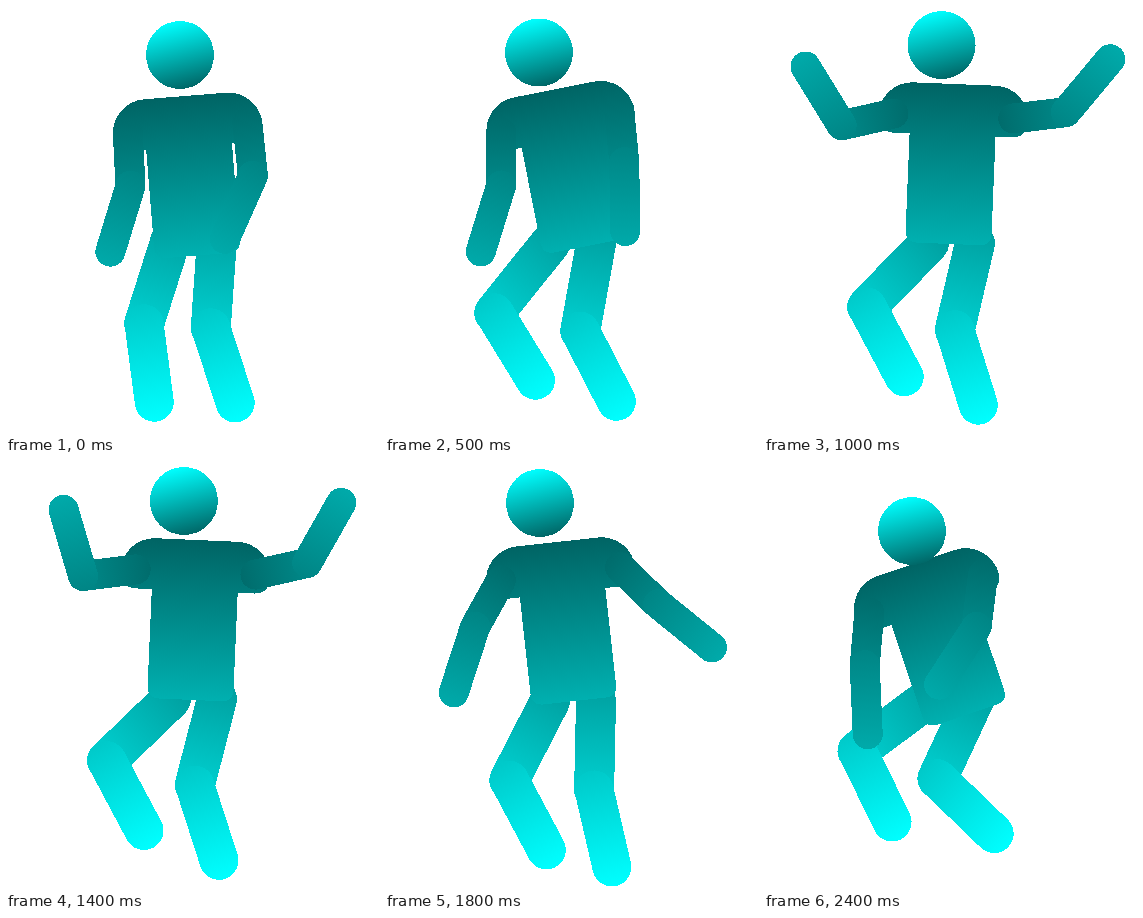
Recreate the animation shown at these times as an HTML page. Size 373 px wide and 428 px high, loop 2.5 s.

```html
<!DOCTYPE html>
<html lang="en">
<head>
<meta charset="utf-8">
<title>Dancing figure</title>
<style>
  html, body { margin: 0; width: 100%; height: 100%; overflow: hidden; background: #fff; }
  svg { display: block; width: 373px; height: 428px; }
</style>
</head>
<body>
<svg id="stage" viewBox="0 0 373 428" shape-rendering="crispEdges"><defs id="defs"></defs></svg>
<script>
const NS = 'http://www.w3.org/2000/svg';
const stage = document.getElementById('stage');
const defs = document.getElementById('defs');
const STEP = 100, STEPS = 25;
const UPPER_ARM = 53, FOREARM = 69, THIGH = 89, CALF = 79;
const SHOULDER = { x: 60, y: 32 };
const HIPS = { left: 165, right: 211 };

const linear = t => t;
const smooth = t => t * t * (3 - 2 * t);
const easeIn = power => t => t ** power;
const easeOut = power => t => 1 - (1 - t) ** power;

// Arms and legs hold the angles of the upper and lower part: 0 points right, 90 down.
const stand = {
  body: { headX: 174, headY: 49, x: 179, y: 90, tilt: -4.6, hipY: 233 },
  arms: { left: 87, leftLow: 107, right: 84, rightLow: 114 },
  legs: { left: 107.6, leftLow: 82.6, right: 94, rightLow: 72 }
};
const crouch = {
  body: { headX: 148, headY: 69, x: 152, y: 101, tilt: -18.6, hipY: 236 },
  arms: { left: 95, leftLow: 87.5, right: 97, rightLow: 123 },
  legs: { left: 143.5, leftLow: 64, right: 115, rightLow: 44 }
};
const rise = {
  body: { headX: 153, headY: 52, x: 166, y: 87, tilt: -16, hipY: 236 },
  arms: { left: 84, leftLow: 107, right: 93, rightLow: 100 },
  legs: { left: 140.4, leftLow: 55, right: 109.2, rightLow: 48.5 }
};
const swing = {
  body: { headX: 155, headY: 41, x: 172, y: 80, tilt: -6.3, hipY: 239 },
  arms: { left: 119, leftLow: 108, right: 44, rightLow: 39 },
  legs: { left: 117.2, leftLow: 62, right: 91.2, rightLow: 77 }
};
const cheer = {
  body: { headX: 178, headY: 39, x: 191, y: 78, tilt: 2.5, hipY: 237 },
  arms: { left: 175, leftLow: 259.5, right: -15, rightLow: -64.5 },
  legs: { left: 136.8, leftLow: 62, right: 105, rightLow: 72 }
};

// The dance runs through these moves and then back again.
const even = { body: linear, arms: linear, legs: linear };
const moves = [
  { from: stand, to: crouch, begin: 0, end: 1, ease: even },
  { from: crouch, to: rise, begin: 1, end: 3, ease: even },
  { from: rise, to: swing, begin: 3, end: 7,
    ease: { body: smooth, arms: easeIn(2.5), legs: smooth } },
  { from: swing, to: cheer, begin: 7, end: STEPS / 2,
    ease: { body: easeOut(5), arms: easeOut(2.5), legs: easeOut(2.5) } }
];

function poseAt(step) {
  const { from, to, begin, end, ease } = moves.find(move => step < move.end);
  const time = (step - begin) / (end - begin);
  const blend = part => {
    const k = ease[part](time), mixed = {};
    for (const key in from[part]) mixed[key] = from[part][key] + (to[part][key] - from[part][key]) * k;
    return mixed;
  };
  return { body: blend('body'), arms: blend('arms'), legs: blend('legs') };
}

function add(parent, tag, attrs) {
  const node = document.createElementNS(NS, tag);
  for (const key in attrs) node.setAttribute(key, attrs[key]);
  return parent.appendChild(node);
}

function shade(id, from, to, turn = 0) {
  const gradient = add(defs, 'linearGradient',
    { id, x1: 0, y1: 0, x2: 0, y2: 1, gradientTransform: `rotate(${turn} .5 .5)` });
  [from, to].forEach((c, i) =>
    add(gradient, 'stop', { offset: i, 'stop-color': `rgb(0,${c},${c})` }));
  return `url(#${id})`;
}

// Returns a function that lays the limb from a joint at an angle and gives its far end.
function limb(fill, width, length) {
  const node = add(stage, 'rect',
    { x: -width / 2, y: -width / 2, width, height: length + width, rx: width / 2, fill });
  return (joint, angle) => {
    node.setAttribute('transform', `translate(${joint.x} ${joint.y}) rotate(${angle - 90})`);
    return reach(joint, angle, length);
  };
}

const sides = (...args) => ({ left: limb(...args), right: limb(...args) });

function reach(from, degrees, length) {
  const a = degrees * Math.PI / 180;
  return { x: from.x + Math.cos(a) * length, y: from.y + Math.sin(a) * length };
}

const thighs = sides(shade('thigh', 157, 216), 40, THIGH);
const calves = sides(shade('calf', 201, 255), 39, CALF);
const torso = add(stage, 'path', {
  fill: shade('torso', 100, 176),
  d: 'M-41 0H41A34 34 0 0 1 75 34Q75 50 60 51H43V148Q43 160 31 160' +
     'H-31Q-43 160 -43 148V51H-60Q-75 50 -75 34A34 34 0 0 1 -41 0Z'
});
const upperArms = sides(shade('upper', 108, 143), 30, UPPER_ARM);
const forearms = sides(shade('fore', 133, 170), 30, FOREARM);
const head = add(stage, 'circle', { r: 34, fill: shade('head', 255, 103, -14) });

function draw(ms) {
  const count = Math.floor(ms / STEP) % STEPS;
  const { body, arms, legs } = poseAt(Math.min(count, STEPS - count));

  head.setAttribute('transform', `translate(${body.headX} ${body.headY})`);
  torso.setAttribute('transform', `translate(${body.x} ${body.y}) rotate(${body.tilt})`);

  for (const side of ['left', 'right']) {
    const across = side === 'left' ? -SHOULDER.x : SHOULDER.x;
    const shoulder = reach(reach(body, body.tilt, across), body.tilt + 90, SHOULDER.y);
    const elbow = upperArms[side](shoulder, arms[side]);
    forearms[side](elbow, arms[side + 'Low']);

    const knee = thighs[side]({ x: HIPS[side], y: body.hipY }, legs[side]);
    calves[side](knee, legs[side + 'Low']);
  }
}

const start = performance.now();
function tick() {
  draw(performance.now() - start);
  requestAnimationFrame(tick);
}
tick();
</script>
</body>
</html>
```
